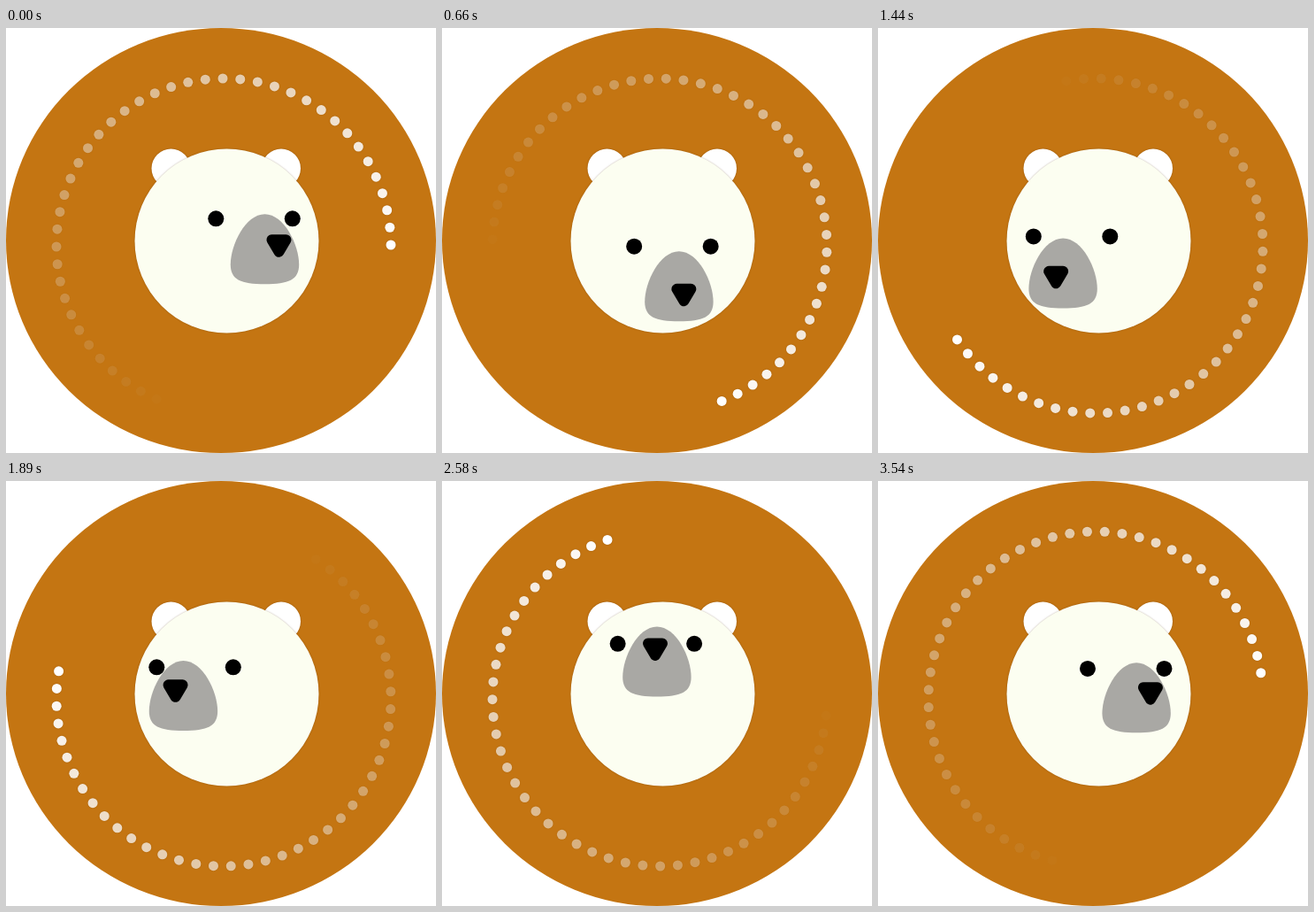
An HTML page with a canvas for the animation above (3.57 s loop, 486 px wide and 480 px high).

```html
<!DOCTYPE html>
<html lang="en">
<head>
<meta charset="utf-8">
<title>Bear loader</title>
<style>
  html, body { margin: 0; width: 100%; height: 100%; overflow: hidden; background: #fff; }
  canvas { display: block; }
</style>
</head>
<body>
<canvas id="stage" width="486" height="480"></canvas>
<script>
const ctx = document.getElementById('stage').getContext('2d');
const LOOP = 3570, STEP = 30, DOTS = 42;

// [time in ms, angle of the leading dot, angle of the gaze], in degrees
const KEYS = [
  [0, -0.3, -2], [360, 37.2, 36], [990, 102.3, 99.3], [1890, 189.5, 190.8],
  [2580, 251.8, 261.7], [3000, 294.5, 301.5], [3540, 351.1, 352]
];

const muzzle = new Path2D(
  'M0 0C22 0 38.7 35 38.7 57C38.7 74 27 79 0 79C-27 79 -38.7 74 -38.7 57C-38.7 35 -22 0 0 0Z');
const nose = new Path2D('M-8 -7H8L0 6.5Z');

function anglesAt(time) {
  let k = 1;
  while (k < KEYS.length - 1 && time > KEYS[k][0]) k++;
  const a = KEYS[k - 1], b = KEYS[k];
  const f = (time - a[0]) / (b[0] - a[0]);
  return [1, 2].map(i => (a[i] + (b[i] - a[i]) * f) * Math.PI / 180);
}

function ellipse(x, y, rx, color, ry = rx) {
  ctx.fillStyle = color;
  ctx.beginPath();
  ctx.ellipse(x, y, rx, ry, 0, 0, 2 * Math.PI);
  ctx.fill();
}

function shadow(alpha, blur) {
  ctx.shadowColor = `rgba(70, 35, 0, ${alpha})`;
  ctx.shadowBlur = blur;
}

function drawTrail(head) {
  shadow(0.25, 2);
  for (let i = 0; i < DOTS; i++) {
    const a = head - i * Math.PI / 30;
    ctx.globalAlpha = 1 - i / DOTS;
    ellipse(246 + 189 * Math.cos(a), 246 + 189 * Math.sin(a), 5.5, '#fff');
  }
  ctx.globalAlpha = 1;
}

function drawBear(gaze) {
  const c = Math.cos(gaze), s = Math.sin(gaze);
  shadow(0.35, 2);
  for (const x of [186.5, 311]) ellipse(x, 158.5, 22, '#fff');
  ellipse(249.5, 240.5, 104, '#fcfef1');
  shadow(0, 0);

  ctx.save();
  ctx.translate(249.7 + 46.5 * c - 3.7 * c * c, 211.8 + 46 * s - 1.8 * s * s);
  ctx.fillStyle = '#a9a8a4';
  ctx.fill(muzzle);
  ctx.restore();

  for (const x of [203.5, 290]) ellipse(x + 33.8 * c, 216.5 + 33 * s, 9, '#000');

  ctx.save();
  ctx.translate(249.5 + 59 * c, 248.3 + 58.5 * s);
  ctx.fillStyle = ctx.strokeStyle = '#000';
  ctx.lineWidth = 12;
  ctx.lineJoin = 'round';
  ctx.fill(nose);
  ctx.stroke(nose);
  ctx.restore();
}

function draw() {
  const time = Math.floor(performance.now() % LOOP / STEP) * STEP;
  const [head, gaze] = anglesAt(time);
  ctx.clearRect(0, 0, 486, 480);
  ellipse(243, 240, 243, '#c47512', 240);
  drawTrail(head);
  drawBear(gaze);
  requestAnimationFrame(draw);
}
draw();
</script>
</body>
</html>
```
